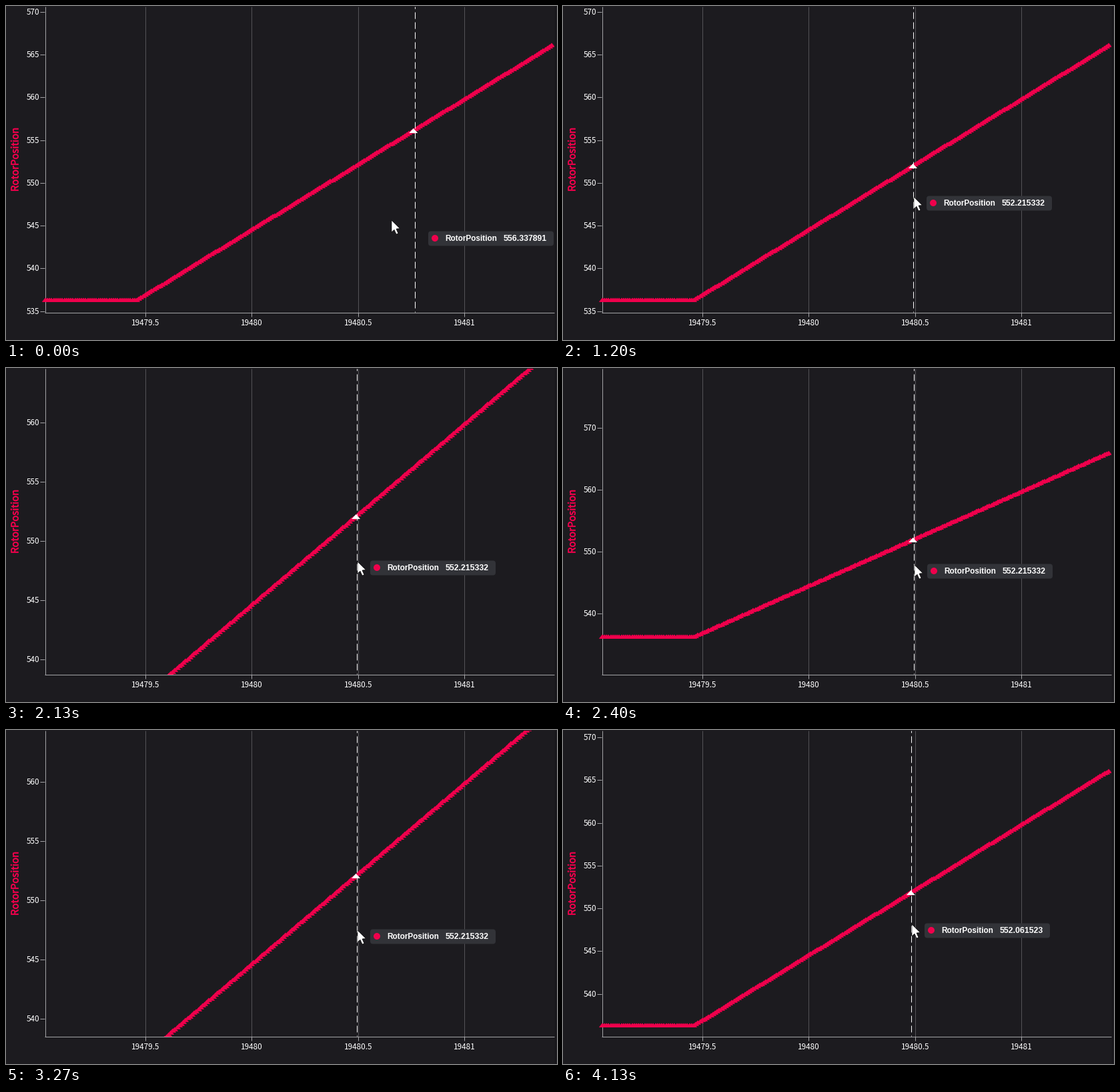
These frames come from a looping animation (826x502 px, 4.87 s). A matplotlib script:

```python
import numpy as np
import matplotlib.pyplot as plt
from matplotlib.animation import FuncAnimation
from matplotlib.collections import PolyCollection
from matplotlib.patches import Circle, FancyBboxPatch, Polygon, Rectangle
from matplotlib.patheffects import withStroke

W, H, DPI = 826, 502, 64
PX = 72 / DPI                      # one pixel in points
LOOP, FRAMES = 4870, 244
TICK = 1000 / 15                   # the screen refreshes 15 times a second

BG, RED, WHITE = "#1c1b1f", "#f0004c", "#ffffff"
AXIS, GRID, TIP = "#a3a3a6", "#535256", "#323338"
LEFT, RIGHT, TOP, BOTTOM = 58, 822, 1, 460
SANS = ["Noto Sans CJK JP", "Liberation Sans"]
BOLD = ["Liberation Sans"]

# Samples, counted from the one the pointer rests on
STEP, ORIGIN = 3.19, 524.6
FLAT = 536.48
SCALE, Y550 = 12.857, 265.4        # unzoomed pixels per unit, height of 550
ZOOM = 1 / 0.85                    # one wheel notch

# Key points: (tick, pointer x, readout y) and (tick, wheel notches)
PATH = np.array([(0, 612, 349), (2, 576, 331), (8, 555, 314), (13, 524, 297),
                 (18, 524, 296), (19, 525, 295), (28, 525, 295), (36, 525, 305),
                 (43, 525, 310), (52, 525, 310), (53, 524, 309), (60, 524, 309),
                 (62, 521, 301)])
WHEEL = np.array([(18, 0), (19, 1), (22, 1), (28, 4), (29, 5), (36, -2),
                  (37, -1), (39, -1), (43, 4), (44, 4), (45, 5), (46, 4),
                  (47, 4), (51, 0)])


def along(keys, k, column):
    return np.interp(k, keys[:, 0], keys[:, column])


def pointer(k):
    return int(round(along(PATH, k, 1))), int(round(along(PATH, k, 2)))


def notches(k):
    return int(np.floor(along(WHEEL, k, 1) + 1e-6))


def sample(i):
    """Signal value of sample i, in encoder counts of 1/4096."""
    counts = np.round(625.4 * i + 4.6 * np.sin(14 * np.pi / 27 * i))
    return np.maximum(552.215332 + counts / 4096, FLAT)


def view(k):
    """Scale and height of 550; each notch zooms about the pointer."""
    base = Y550
    for j in range(1, k + 1):
        anchor = pointer(j)[1] - 10
        base = anchor + (base - anchor) * ZOOM ** (notches(j) - notches(j - 1))
    return SCALE * ZOOM ** notches(k), base


def triangles(x, y, half, height):
    shape = np.array([(0, 0), (half, height), (-half, height)])
    return np.stack([x, y], axis=-1)[..., None, :] + shape


LAST = int(LOOP / TICK)
VIEWS = [view(k) for k in range(LAST + 1)]
INDEX = np.arange(-146, 93)
XS, VALUES = ORIGIN + STEP * INDEX, sample(INDEX)
ARROW = np.array([(0, 0), (0, 18), (4, 14.3), (7, 21), (10, 19.8),
                  (7, 13), (12.5, 12.5)])

fig = plt.figure(figsize=(W / DPI, H / DPI), dpi=DPI, facecolor=BG)
ax = fig.add_axes([0, 0, 1, 1])
ax.set_xlim(0, W)
ax.set_ylim(H, 0)
ax.axis("off")


def line(xs, ys, color, z):
    return ax.plot(xs, ys, color=color, lw=PX, zorder=z,
                   solid_capstyle="butt", dash_capstyle="butt")[0]


def label(x, y, s, size, family=SANS, color=WHITE, **kw):
    kw.setdefault("va", "baseline")
    return ax.text(x, y, s, fontsize=size * PX, family=family, color=color, **kw)


# Fixed frame, grid and time labels
for n in range(4):
    x = int(208.4 + 159.4 * n)
    line([x + 0.5] * 2, [TOP, BOTTOM], GRID, 1)
    line([x + 0.5] * 2, [BOTTOM, BOTTOM + 7], AXIS, 1)
    label(x + 1, 480, f"{19479.5 + n / 2:g}", 11.7, ha="center")
line([LEFT + 0.5] * 2, [TOP, BOTTOM + 1], AXIS, 2)
line([LEFT, RIGHT], [BOTTOM + 0.5] * 2, AXIS, 2)
line([RIGHT + 0.5] * 2, [0, H], "#121215", 1)
label(14.5, 231, "RotorPosition", 14.9, color=RED, rotation=90,
      ha="center", va="center",
      path_effects=[withStroke(linewidth=0.6 * PX, foreground=RED)])

# Value axis
ticks = [(line([LEFT - 7, LEFT], [0, 0], AXIS, 2),
          label(50.5, 0, "", 11.7, ha="right")) for _ in range(12)]

# Signal
curve = PolyCollection([], facecolors=RED, edgecolors=RED, linewidths=0.8 * PX,
                       zorder=3)
ax.add_collection(curve, autolim=False)
curve.set_clip_path(Rectangle((50, TOP), RIGHT - 50, BOTTOM + 1 - TOP,
                              transform=ax.transData))

# Pointer line, highlighted sample, readout, arrow
guide = line([0, 0], [TOP, BOTTOM], WHITE, 4)
guide.set_linestyle((7, (10, 5)))
mark = ax.add_patch(Polygon(np.zeros((3, 2)), fc=WHITE, ec="none", zorder=5))
box = ax.add_patch(FancyBboxPatch((0, 0), 180, 14, fc=TIP, ec="none", zorder=6,
                                  boxstyle="round,pad=4,rounding_size=4"))
dot = ax.add_patch(Circle((0, 0), 5, fc=RED, ec="none", zorder=7))
title = label(0, 0, "RotorPosition", 11.8, BOLD, weight="bold", zorder=7)
number = label(0, 0, "", 12.2, BOLD, weight="bold", zorder=7)
arrow = ax.add_patch(Polygon(ARROW, fc=WHITE, ec="#000000", lw=0.6 * PX, zorder=8))


def draw_axis(scale, base):
    step = next(s for s in (1, 2, 5, 10, 20) if s * scale >= 47.5)
    low = 550 - (BOTTOM - base) / scale
    first = int(np.ceil(low / step)) * step
    for n, (tick, text) in enumerate(ticks):
        value = first + n * step
        y = base - (value - 550) * scale
        shown = 0 <= y <= BOTTOM
        tick.set_visible(shown)
        text.set_visible(shown)
        row = int(np.floor(y))
        tick.set_ydata([row + 0.5] * 2)
        text.set_y(row + 5)
        text.set_text(str(value))


def draw(frame):
    # Whole screen ticks, as reached by the end of this frame
    k = min(int(((frame + 1) * LOOP / FRAMES + 3) / TICK), LAST)
    scale, base = VIEWS[k]
    draw_axis(scale, base)

    ys = base - (VALUES - 550) * scale
    curve.set_verts(triangles(np.round(XS), np.round(ys), 4.5, 5.5))

    x, y = pointer(k)
    guide.set_xdata([x + 0.5] * 2)
    i = int(round((x - 525) / STEP))
    value = float(sample(i))
    mark.set_xy(triangles(ORIGIN + STEP * i, base - (value - 550) * scale, 6.5, 7))

    box.set_bounds(x + 25, y - 6.5, 180, 14)
    dot.center = (x + 31, y)
    title.set_position((x + 46, y + 4))
    number.set_position((x + 134, y + 4))
    number.set_text(f"{value:.6f}")

    # The arrow runs ahead of the chart while it sweeps
    cx, cy = pointer(k + 2 if k < 13 else k)
    arrow.set_xy(ARROW + (cx + 2, cy - 9))
    return []


anim = FuncAnimation(fig, draw, frames=FRAMES, interval=LOOP / FRAMES,
                     init_func=lambda: draw(0), repeat=True, repeat_delay=0)
plt.show()
```
